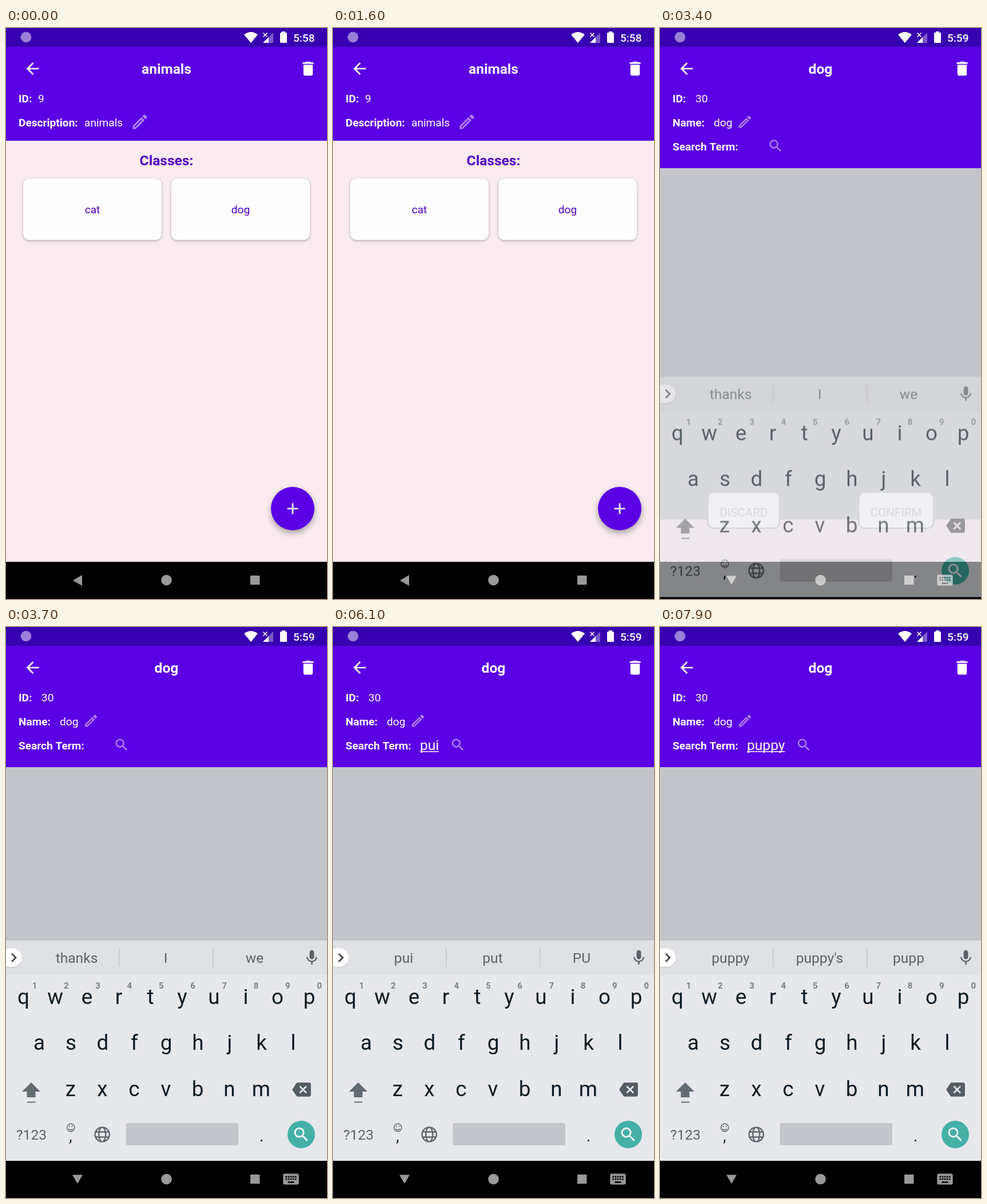
Recreate the animation shown at these times as an HTML page with a canvas. Size 561 by 998 pixels, loop 8000 ms.

```html
<!DOCTYPE html>
<html lang="en">
<head>
<meta charset="utf-8">
<style>
html, body { margin: 0; width: 100%; height: 100%; overflow: hidden; background: #000; }
canvas { display: block; width: 561px; height: 998px; }
</style>
</head>
<body>
<canvas id="stage" width="561" height="998"></canvas>
<script>
const LOOP = 8000, W = 561, H = 998;
const PURPLE = '#5b00e5', INK = '#0b1a24', SLATE = '#5b6268', GRAY = '#c4c5ca', PINK = '#faebf0', FAINT = 'rgba(255,255,255,.52)';
const SMALL = 19.1, LARGE = 24.57;
const OPEN = 1700, MINUTE = 2900, FOCUS = 3200, KEYBOARD = 3400;

// Suggestions lead the typed text slightly: [time, text, three suggestions]
const TYPING = [
  [0, '', 'thanks', 'I', 'we'],
  [4700, 'p', 'p', 'please', 'pic'],
  [5300, 'pu', 'pu', 'put', 'PU'],
  [5900, 'pui', 'pui', 'put', 'PU'],
  [6400, 'pu', 'pu', 'put', 'PU'],
  [6700, 'pup', 'pup', 'puppy', 'pups'],
  [7100, 'pupp', 'pupp', 'puppy', 'pup'],
  [7500, 'puppy', 'puppy', "puppy's", 'pupp']
];
const typed = t => TYPING.filter(s => s[0] <= t).pop();

const ICONS = {
  back: 'M20 11H7.83l5.59-5.59L12 4l-8 8 8 8 1.41-1.41L7.83 13H20v-2z',
  trash: 'M6 19c0 1.1.9 2 2 2h8c1.1 0 2-.9 2-2V7H6v12zM19 4h-3.5l-1-1h-5l-1 1H5v2h14V4z',
  pencil: 'M14.06 9.02l.92.92L5.92 19H5v-.92l9.06-9.06M17.66 3c-.25 0-.51.1-.7.29l-1.83 1.83 3.75 3.75 1.83-1.83c.39-.39.39-1.02 0-1.41l-2.34-2.34c-.2-.2-.45-.29-.71-.29zm-3.6 3.19L3 17.25V21h3.75L17.81 9.94l-3.75-3.75z',
  search: 'M15.5 14h-.79l-.28-.27C15.41 12.59 16 11.11 16 9.5 16 5.91 13.09 3 9.5 3S3 5.91 3 9.5 5.91 16 9.5 16c1.61 0 3.09-.59 4.23-1.57l.27.28v.79l5 4.99L20.49 19l-4.99-5zm-6 0C7.01 14 5 11.99 5 9.5S7.01 5 9.5 5 14 7.01 14 9.5 11.99 14 9.5 14z',
  keys: 'M20 5H4c-1.1 0-2 .9-2 2v10c0 1.1.9 2 2 2h16c1.1 0 2-.9 2-2V7c0-1.1-.9-2-2-2zm-9 3h2v2h-2V8zm0 3h2v2h-2v-2zM8 8h2v2H8V8zm0 3h2v2H8v-2zm-1 2H5v-2h2v2zm0-3H5V8h2v2zm9 7H8v-2h8v2zm0-4h-2v-2h2v2zm0-3h-2V8h2v2zm3 3h-2v-2h2v2zm0-3h-2V8h2v2z',
  mic: 'M12 14c1.66 0 3-1.34 3-3V5c0-1.66-1.34-3-3-3S9 3.34 9 5v6c0 1.66 1.34 3 3 3zm5.3-3c0 3-2.54 5.1-5.3 5.1S6.7 14 6.7 11H5c0 3.41 2.72 6.23 6 6.72V21h2v-3.28c3.28-.48 6-3.3 6-6.72h-1.7z',
  erase: 'M22 3H7c-.69 0-1.23.35-1.59.88L0 12l5.41 8.11c.36.53.9.89 1.59.89h15c1.1 0 2-.9 2-2V5c0-1.1-.9-2-2-2zm-3 12.59L17.59 17 14 13.41 10.41 17 9 15.59 12.59 12 9 8.41 10.41 7 14 10.59 17.59 7 19 8.41 15.41 12 19 15.59z'
};

const screen = document.getElementById('stage').getContext('2d');
const layer = document.createElement('canvas');
layer.width = W;
layer.height = H;
const overlay = layer.getContext('2d');
let c = screen;

function text(str, x, y, size, color, weight = 400, align = 'left') {
  c.font = `${weight} ${size}px Roboto, sans-serif`;
  c.textAlign = align;
  c.fillStyle = color;
  c.fillText(str, x, y);
}
const centered = (str, x, y, size, color, weight) => text(str, x, y, size, color, weight, 'center');

function rect(x, y, w, h, color, r = 0) {
  c.fillStyle = color;
  c.beginPath();
  c.roundRect(x, y, w, h, r);
  c.fill();
}

function disc(x, y, r, color) {
  c.fillStyle = color;
  c.beginPath();
  c.arc(x, y, r, 0, 7);
  c.fill();
}

function path(d, color, width) {
  const p = new Path2D(d);
  if (width) {
    c.strokeStyle = color;
    c.lineWidth = width;
    c.stroke(p);
  } else {
    c.fillStyle = color;
    c.fill(p);
  }
}

function icon(name, x, y, scale, color) {
  c.save();
  c.translate(x, y);
  c.scale(scale, scale);
  c.translate(-12, -12);
  path(ICONS[name], color);
  c.restore();
}

function withShadow(dy, blur, alpha, draw) {
  c.save();
  c.shadowColor = `rgba(0,0,0,${alpha})`;
  c.shadowOffsetY = dy;
  c.shadowBlur = blur;
  draw();
  c.restore();
}

function statusBar(t) {
  rect(0, 0, W, 33, '#3700b0');
  disc(35, 16, 8, 'rgba(255,255,255,.5)');
  c.setLineDash([1.5, 1.5]);
  path('M26.5 16a8.5 8.5 0 1 0 17 0a8.5 8.5 0 1 0 -17 0', 'rgba(255,255,255,.7)', 2);
  c.setLineDash([]);
  path('M416 11.5Q428 2.5 440 11.5L428 26Z', '#fff');
  path('M467 8V26H449Z', 'rgba(255,255,255,.35)');
  path('M459 16V26H449Z', '#fff');
  path('M449.5 8.5l7 7m0-7l-7 7', '#fff', 1.6);
  rect(479, 8, 12, 18, '#fff', 1.5);
  rect(482, 6, 6, 3, '#fff');
  text(t < MINUTE ? '5:58' : '5:59', 539.5, 23.5, SMALL, '#fff', 500, 'right');
}

function header(title, id, idX, height) {
  rect(0, 33, W, height - 33, PURPLE);
  icon('back', 46.5, 71, 1.365, '#fff');
  icon('trash', 528, 71, 1.365, '#fff');
  centered(title, 280.5, 80, LARGE, '#fff', 700);
  text('ID:', 22, 129.5, SMALL, '#fff', 700);
  text(id, idX, 129.5, SMALL, '#fff');
}

function listPage() {
  rect(0, 0, W, H, PINK);
  header('animals', '9', 56, 197);
  text('Description:', 22, 171.5, SMALL, '#fff', 700);
  text('animals', 137, 171.5, SMALL, '#fff');
  icon('pencil', 234, 164, 1.4, FAINT);
  centered('Classes:', 280.5, 239.5, LARGE, '#5000c8', 700);
  [['cat', 30], ['dog', 289]].forEach(([name, x]) => {
    withShadow(1.5, 4, .3, () => rect(x, 263, 242, 107.5, '#fffdff', 11));
    centered(name, x + 121, 324, SMALL, '#4f00c0');
  });
  withShadow(5, 11, .32, () => disc(501, 840, 38, PURPLE));
  path('M491.5 840h19m-9.5-9.5v19', '#fff', 2.7);
}

function button(label, x, w) {
  rect(x - 3, 809.5, w + 6, 66, GRAY, 12);
  rect(x, 812.5, w, 60.5, '#fffdff', 9);
  centered(label, x + w / 2, 853.5, 20.5, GRAY);
}

function classPage(t) {
  rect(0, 0, W, H, PINK);
  rect(0, 245, W, 614, GRAY);
  header('dog', '30', 62, 245);
  text('Name:', 22, 171.5, SMALL, '#fff', 700);
  text('dog', 94, 171.5, SMALL, '#fff');
  icon('pencil', 148.5, 164, 1.18, FAINT);
  text('Search Term:', 22, 213.5, SMALL, '#fff', 700);
  const term = typed(t - 80)[1];
  text(term, 152, 215, LARGE, '#fff');
  const width = c.measureText(term).width;
  if (term) rect(152, 217, width, 1.6, '#fff');
  if (t < FOCUS) rect(159, 224.5, 16, 1.5, '#3a0a9c');
  icon('search', 185 + Math.max(17, width), 206, 1.17, FAINT);
  button('DISCARD', 85, 122.5);
  button('CONFIRM', 348.5, 128);
}

function keyRow(letters, x, y) {
  [...letters].forEach((k, i) => centered(k, x + i * 55.5, y, 36.8, INK));
}

function keyboard(t) {
  rect(0, 547, W, 386, '#e7e8ec');
  rect(0, 547, W, 61, '#dfe1e5');
  rect(0, 546, W, 1.5, '#b9babf');
  withShadow(1, 2, .15, () => rect(-10, 561.5, 37.5, 32.5, '#fff', 16));
  path('M10 571l7 7-7 7', '#3d4449', 2.7);
  typed(t).slice(2).forEach((s, i) => centered(s, 123.5 + i * 155.5, 587, LARGE, SLATE));
  [197, 361].forEach(x => rect(x, 562, 1.5, 32, '#c3c5ca'));
  icon('mic', 534.5, 578, 1.32, SLATE);

  keyRow('qwertyuiop', 30.5, 659);
  [...'1234567890'].forEach((n, i) => centered(n, 50 + i * 55.3, 632, 15, '#7a8085', 700));
  keyRow('asdfghjkl', 58, 739);
  keyRow('zxcvbnm', 113, 819.5);

  path('M44 796L60 812H51.5V822H36.5V812H28Z', '#636c72');
  rect(37, 829.5, 14.5, 2, '#636c72');
  icon('erase', 516.5, 808.5, 1.365, '#535c62');

  text('?123', 18, 896, LARGE, SLATE);
  path('M106.5 875a6.7 6.7 0 1 0 13.4 0a6.7 6.7 0 1 0 -13.4 0M109.5 877q3.7 4 7.4 0', SLATE, 1.4);
  disc(110.8, 873, 1.1, SLATE);
  disc(115.6, 873, 1.1, SLATE);
  centered(',', 113, 899, 27, INK);
  path('M155.6 887a12.6 12.6 0 1 0 25.2 0a12.6 12.6 0 1 0 -25.2 0m6.6 0a6 12.6 0 1 0 12 0a6 12.6 0 1 0 -12 0M157 882.5h22.4M157 891.5h22.4', '#5f686e', 2.4);
  rect(209.5, 867, 196.5, 39, '#c5c6cb', 3);
  centered('.', 446.5, 899, 27, INK);
  disc(516, 887, 24, '#45b0a6');
  icon('search', 516, 887, 1.37, '#fff');
}

function navIcons(typing) {
  const color = 'rgba(255,255,255,.6)';
  path(typing ? 'M116 957.5H134L125 973Z' : 'M117 965.5L133 956V975Z', color);
  disc(280.5, 965, 9.3, color);
  rect(427, 957, 16.5, 16, color, 1);
  if (typing) icon('keys', 498, 965, 1.37, color);
}

function draw(t) {
  const typing = t >= KEYBOARD;
  c = screen;
  t < OPEN ? listPage() : classPage(t);
  statusBar(t);
  rect(0, 933, W, 65, '#000');
  if (typing) {
    c = overlay;
    c.clearRect(0, 0, W, H);
    keyboard(t);
    c = screen;
    const u = Math.min(1, (t - KEYBOARD) / 250);
    c.globalAlpha = .57 + .43 * u;
    c.drawImage(layer, 0, 62 * (1 - u) ** 2);
    c.globalAlpha = 1;
  }
  navIcons(typing);
}

const start = performance.now();
function tick(now) {
  draw(Math.max(0, now - start) % LOOP);
  requestAnimationFrame(tick);
}
draw(0);
requestAnimationFrame(tick);
</script>
</body>
</html>
```
